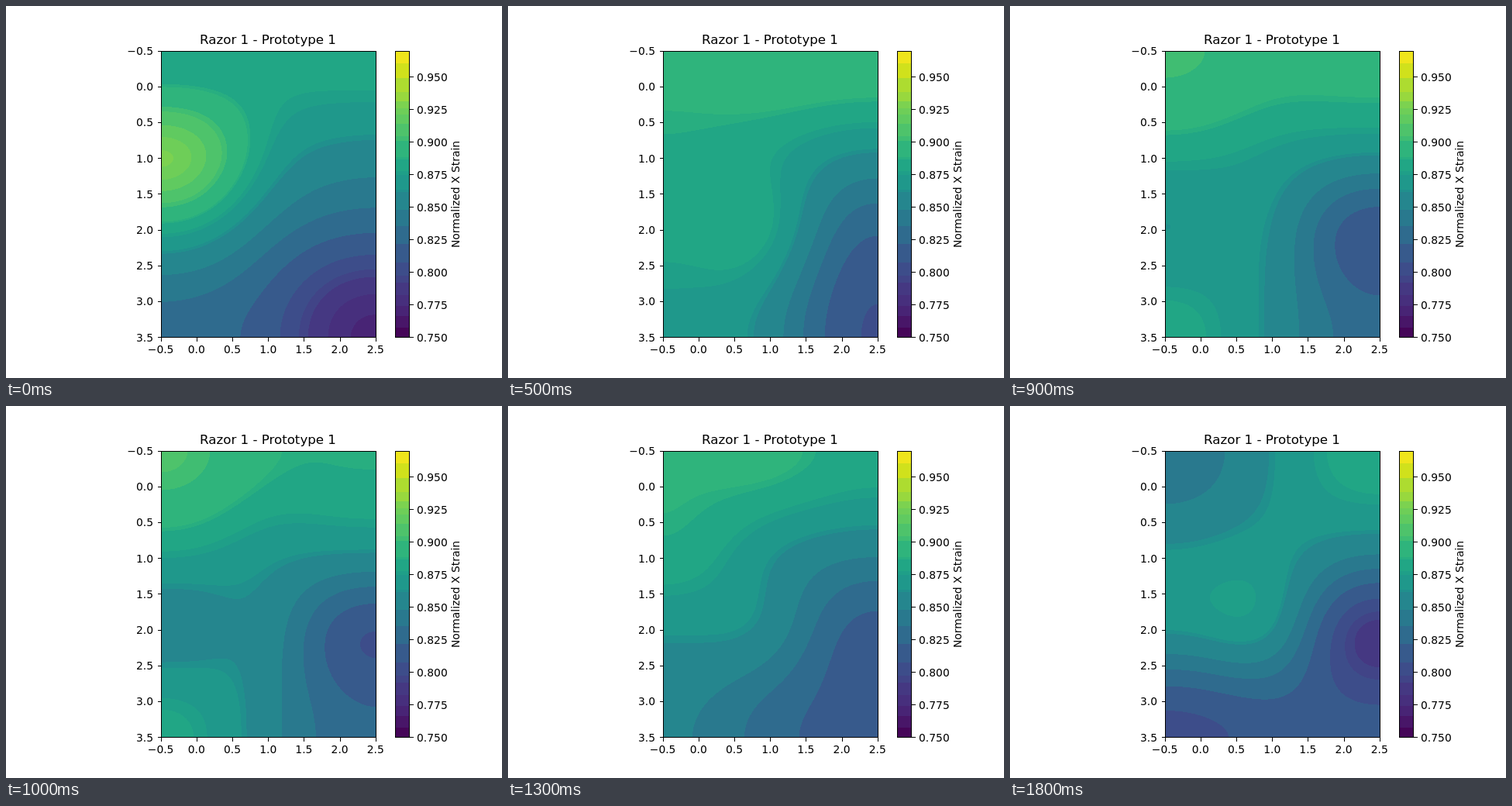
Write an HTML page with a canvas that moves like this. It is 640 px wide and 480 px high and loops after 1.9 s.

```html
<!DOCTYPE html>
<html lang="en">
<head>
<meta charset="utf-8">
<title>Strain map</title>
<style>
  html, body { margin: 0; width: 640px; height: 480px; overflow: hidden; background: #fff; }
  canvas { display: block; }
</style>
</head>
<body>
<canvas id="stage" width="640" height="480"></canvas>
<script>
const ctx = document.getElementById('stage').getContext('2d');
const LOOP = 1900, STEP = 100, UNIT = 92.4;
const plot = { x: 199.6, y: 57.6, w: 277.2, h: 369.6 };
const area = { x: 200, y: 58, w: 277, h: 369 };
const bar = { x: 502, w: 18, min: 0.75, span: 0.22 };

// Colour bands: lower bound (in 1/10000) and colour, from high to low.
const bands = [
  [9600, '#efe51c'], [9490, '#d0e11c'], [9380, '#addc30'], [9310, '#98d83e'],
  [9260, '#7cd250'], [9210, '#6ece58'], [9140, '#60ca60'], [9045, '#4ec36b'],
  [9010, '#40bd72'], [8880, '#2fb47c'], [8865, '#28ae80'], [8775, '#21a685'],
  [8745, '#1f9f88'], [8635, '#1f988b'], [8615, '#20908d'], [8475, '#25868e'],
  [8350, '#29798e'], [8215, '#2f6b8e'], [8070, '#375a8c'], [7970, '#3d4d8a'],
  [7920, '#414487'], [7820, '#453882'], [7740, '#472f7d'], [7660, '#482475'],
  [7570, '#481668'], [0, '#450558']
].map(([low, hex]) => ({ low: low / 1e4, hex, rgb: [1, 3, 5].map(i => parseInt(hex.slice(i, i + 2), 16)) }));

const bandOf = v => bands.find(b => v >= b.low);

// Strain (1/10000) on a 3 x 4 lattice: left, centre, right by top, y=1, y=2, bottom.
const keys = [
  [0, [8780, 8800, 8820, 9270, 8740, 8547, 8810, 8450, 8235, 8290, 8125, 7710]],
  [3, [8835, 8918, 8860, 8830, 8710, 8545, 8795, 8850, 8310, 8619, 8400, 7770]],
  [7, [8965, 9030, 9072, 8871, 8850, 8625, 8825, 8710, 8165, 8822, 8695, 8338]],
  [10, [9060, 8895, 8872, 8745, 8655, 8580, 8540, 8555, 8075, 8805, 8530, 8250]],
  [12, [9110, 9060, 8875, 8890, 8645, 8475, 8642, 8505, 8042, 8655, 8325, 8140]],
  [15, [8445, 8605, 8720, 8725, 8618, 8460, 8665, 8675, 8392, 8180, 8185, 8155]],
  [18, [8385, 8625, 8830, 8660, 8680, 8445, 8637, 8620, 7880, 8015, 8125, 8120]]
];

// Spline coefficients whose curve passes through the lattice readings.
function solve3([p, q, r]) {
  const b = (138 * q - 24 * (p + r)) / 90;
  return [(24 * p - b) / 23, b, (24 * r - b) / 23];
}
function solve4([p, q, r, s]) {
  const u = 138 * q - 24 * p, v = 138 * r - 24 * s;
  const b = (91 * u - 23 * v) / 7752, c = (91 * v - 23 * u) / 7752;
  return [(24 * p - b) / 23, b, c, (24 * s - c) / 23];
}

// Cubic B-spline weights for each pixel, mirrored at the edges.
function weights(pixels, start, origin, count) {
  return Array.from({ length: pixels }, (_, i) => {
    const pos = (start + i + 0.5 - origin) / UNIT - 0.5;
    const base = Math.floor(pos), t = pos - base, w = new Array(count).fill(0);
    const cubic = [(1 - t) ** 3, 3 * t ** 3 - 6 * t * t + 4, -3 * t ** 3 + 3 * t * t + 3 * t + 1, t ** 3];
    cubic.forEach((c, k) => {
      let n = base - 1 + k;
      if (n < 0) n = -1 - n;
      if (n >= count) n = 2 * count - 1 - n;
      w[n] += c / 6;
    });
    return w;
  });
}
const wx = weights(area.w, area.x, plot.x, 3);
const wy = weights(area.h, area.y, plot.y, 4);
const dot = (a, b) => a.reduce((sum, v, i) => sum + v * b[i], 0);

function latticeAt(step) {
  let i = 0;
  while (i < keys.length - 2 && step >= keys[i + 1][0]) i++;
  const [s0, a] = keys[i], [s1, b] = keys[i + 1];
  const k = (step - s0) / (s1 - s0);
  return a.map((v, n) => (v + (b[n] - v) * k) / 1e4);
}

const image = ctx.createImageData(area.w, area.h);
function drawField(step) {
  const data = latticeAt(step);
  const rows = [0, 3, 6, 9].map(i => solve3(data.slice(i, i + 3)));
  const columns = [0, 1, 2].map(c => solve4(rows.map(r => r[c])));
  let p = 0;
  for (const w of wy) {
    const line = columns.map(c => dot(w, c));
    for (const u of wx) {
      const v = u[0] * line[0] + u[1] * line[1] + u[2] * line[2];
      image.data.set(bandOf(v).rgb, p);
      image.data[p + 3] = 255;
      p += 4;
    }
  }
  ctx.putImageData(image, area.x, area.y);
}

function text(str, x, y, align, size = 13.89) {
  ctx.font = `${size}px "DejaVu Sans", sans-serif`;
  ctx.textAlign = align;
  ctx.fillText(str, x, y);
}
const label = (v, digits) => v.toFixed(digits).replace('-', '\u2212');

function drawFrame() {
  ctx.strokeStyle = ctx.fillStyle = '#000';
  ctx.lineWidth = 1;
  ctx.strokeRect(200.5, 58.5, 277, 369);
  ctx.strokeRect(502.5, 58.5, 18, 369);
  text('Razor 1 - Prototype 1', 338, 49.3, 'center', 16.67);

  for (let v = -0.5; v <= 3.5; v += 0.5) {
    const y = plot.y + (v + 0.5) * UNIT;
    ctx.fillRect(196, Math.round(y), 5, 1);
    text(label(v, 1), 190, y + 5.3, 'right');
    if (v > 2.5) continue;
    const x = plot.x + (v + 0.5) * UNIT;
    ctx.fillRect(Math.round(x), 428, 1, 5);
    text(label(v, 1), x, 447.7, 'center');
  }
  for (let i = 0; i <= 8; i++) {
    const y = plot.y + plot.h * (1 - i * 0.025 / bar.span);
    ctx.fillRect(521, Math.round(y), 5, 1);
    text(label(bar.min + i * 0.025, 3), 530, y + 5.3, 'left');
  }
  ctx.save();
  ctx.translate(585, 243);
  ctx.rotate(-Math.PI / 2);
  text('Normalized X Strain', 0, 0, 'center');
  ctx.restore();
}

function drawBar() {
  for (let y = 58; y < 428; y++) {
    const v = bar.min + bar.span * (plot.y + plot.h - y - 0.5) / plot.h;
    ctx.fillStyle = bandOf(Math.max(v, 0)).hex;
    ctx.fillRect(bar.x, y, bar.w, 1);
  }
}

let shown = -1;
function draw(step) {
  ctx.fillStyle = '#fff';
  ctx.fillRect(0, 0, 640, 480);
  drawField(step);
  drawBar();
  drawFrame();
  shown = step;
}

const began = performance.now();
function tick() {
  const step = Math.floor(((performance.now() - began) % LOOP) / STEP);
  if (step !== shown) draw(step);
  requestAnimationFrame(tick);
}
tick();
</script>
</body>
</html>
```
